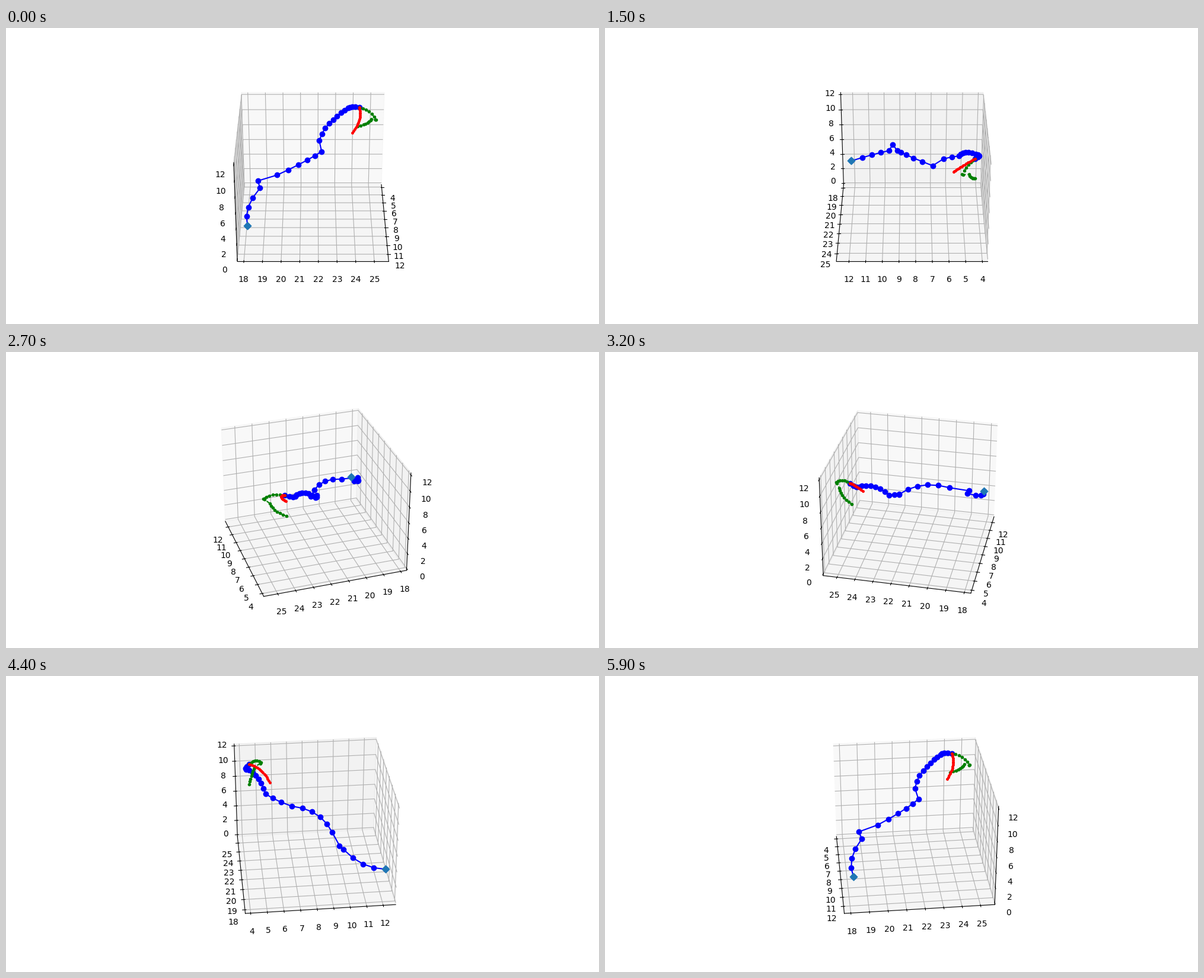
Recreate the animation shown at these times as a matplotlib script. Size 1000 by 500 pixels, loop 6000 ms.

```python
import numpy as np
import matplotlib.pyplot as plt
from matplotlib.animation import FuncAnimation

FRAMES = 60
INTERVAL = 100  # ms


def arc(start, middle, end, count):
    """Parabola through three points, sampled evenly in its parameter."""
    t = np.linspace(0, 1, count)[:, None]
    start, middle, end = map(np.array, (start, middle, end))
    return ((1 - t) * (1 - 2 * t) * start
            + 4 * t * (1 - t) * middle
            + t * (2 * t - 1) * end)


tip = (4.53, 24.33, 11.07)
shoulder = (4.47, 23.69, 10.93)

main = np.vstack([
    arc((12.17, 18.22, 3.73), (10.81, 18.22, 4.56), (9.71, 18.83, 5.81), 5),
    (9.45, 18.71, 6.47),
    arc((9.16, 19.75, 6.91), (8.36, 21.15, 7.70), (6.96, 22.19, 7.70), 6),
    (6.29, 22.06, 8.44),
    (5.79, 22.21, 8.84),
    arc((5.38, 22.40, 9.20), (5.01, 23.07, 10.42), shoulder, 7),
    arc(shoulder, (4.27, 23.93, 10.95), tip, 5)[1:],
])
hook = np.vstack([
    arc(tip, (4.93, 24.86, 10.90), (5.31, 25.27, 10.21), 7),
    (5.26, 25.22, 10.13),
    arc((4.90, 25.01, 9.91), (4.68, 24.76, 9.16), (4.48, 24.26, 8.53), 8),
])
bow = arc(tip, (5.25, 24.31, 10.14), (5.76, 23.92, 8.94), 16)

fig = plt.figure(figsize=(10, 5), dpi=100)
ax = fig.add_subplot(projection="3d")

ax.plot(*main.T, "bo-")
ax.plot(*hook.T, "g.--")
ax.plot(*bow.T, "r.--", markersize=5)
ax.scatter(*main[:1].T, s=40, marker="D", color="tab:blue", depthshade=False)

ax.set(xlim=(3.68, 12.76), ylim=(17.65, 25.77), zlim=(-0.25, 12.25))
ax.set(xticks=range(4, 13), yticks=range(18, 26), zticks=range(0, 13, 2))


def update(frame):
    ax.view_init(elev=30, azim=frame * 360 / FRAMES)
    return ()


anim = FuncAnimation(fig, update, frames=FRAMES, interval=INTERVAL,
                     init_func=lambda: update(0), repeat=True)
plt.show()
```
